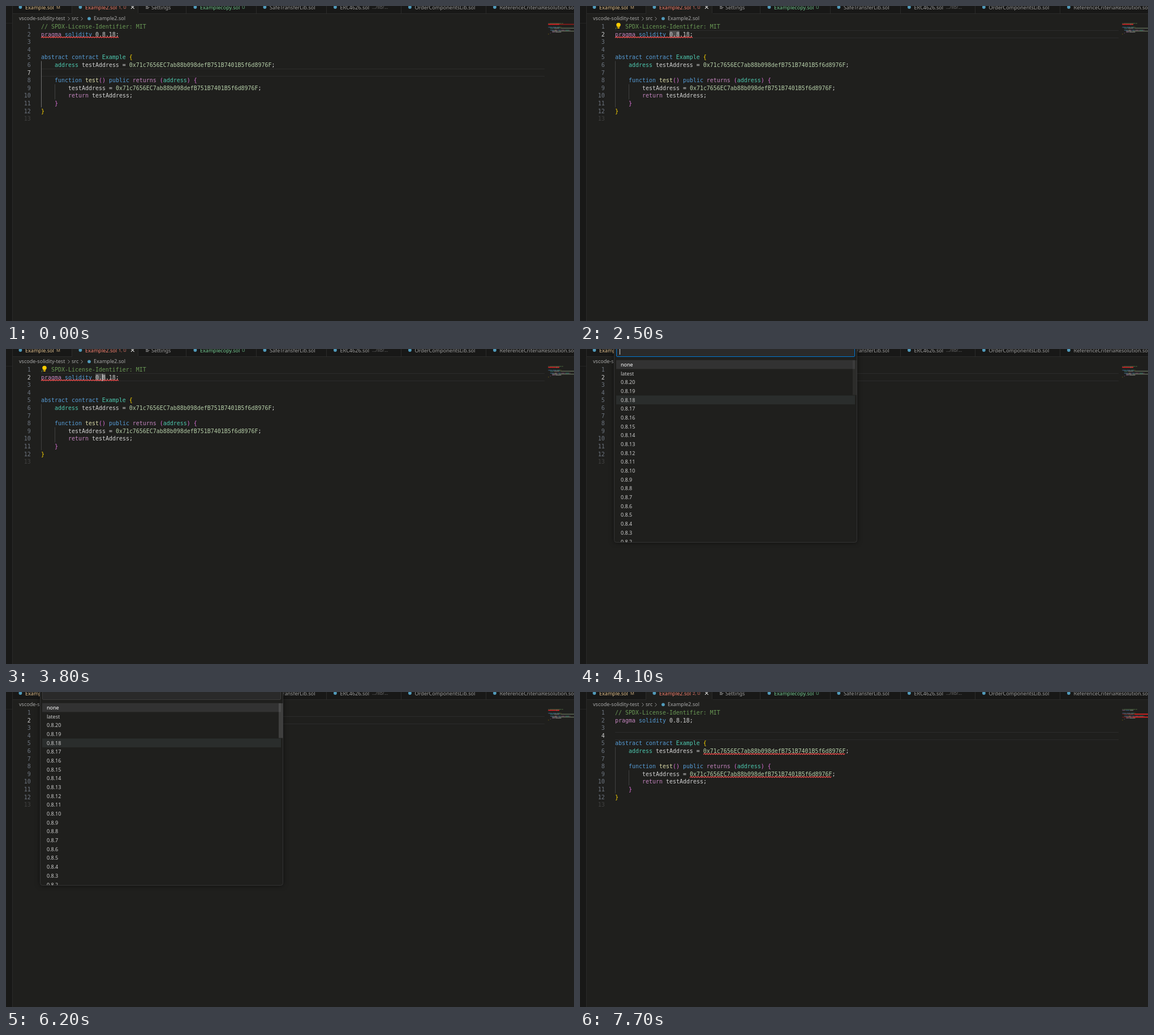
Animation of 1004 by 558 pixels, one loop 8000 ms. Source, as an HTML page:

```html
<!DOCTYPE html>
<html lang="en">
<head>
<meta charset="utf-8">
<title>Solidity editor</title>
<style>
  html, body { margin: 0; width: 100%; height: 100%; overflow: hidden; background: #1f1f1d; }
  svg { display: block; }
  text { white-space: pre; }
  .code { font: 9.967px "DejaVu Sans Mono", monospace; }
  .ui { font: 9px "Noto Sans", "Open Sans", sans-serif; }
</style>
</head>
<body>
<svg id="stage" width="1004" height="558" viewBox="0 0 1004 558"></svg>
<script>
const LOOP = 8000;
const BG = '#1f1f1d', PANEL = '#181817', LINE = '#2b2b2a';
const BLUE = '#569cd6', PINK = '#c586c0', TEAL = '#4ec9b0', GOLD = '#ffd700',
      ORCHID = '#da70d6', PLAIN = '#d4d4d4', NUM = '#b5cea8', FUNC = '#dcdcaa',
      GREEN = '#6a9955', RED = '#f14c4c', ICON = '#519aba';
const HEX = '0x71c7656EC7ab88b098defB751B7401B5f6d8976F';
const LEFT = 62, CHAR = 6, ROW = 13.6, TOP = 29.8;

const stage = document.getElementById('stage');

function add(parent, tag, attrs = {}, content) {
  const node = document.createElementNS('http://www.w3.org/2000/svg', tag);
  for (const key in attrs) node.setAttribute(key, attrs[key]);
  if (content !== undefined) node.textContent = content;
  parent.appendChild(node);
  return node;
}
const group = (parent = stage, attrs) => add(parent, 'g', attrs);
const rect = (p, x, y, width, height, fill, more) =>
  add(p, 'rect', { x, y, width, height, fill, ...more });
const path = (p, d, stroke, width = 1) =>
  add(p, 'path', { d, stroke, 'stroke-width': width, fill: 'none' });
const dot = (p, cx, cy, r = 2.9, fill = ICON) => add(p, 'circle', { cx, cy, r, fill });
const label = (p, x, y, str, fill, size = 9, more = {}) =>
  add(p, 'text', { class: 'ui', x, y, fill, style: `font-size:${size}px`, ...more }, str);
const show = (node, on) => node.setAttribute('visibility', on ? 'visible' : 'hidden');

const rowTop = n => TOP + ROW * (n - 1);
const baseline = n => rowTop(n) + 10.1;
const colX = c => LEFT + CHAR * c;

function bulb(p, x, y) {
  const g = group(p, { transform: `translate(${x} ${y})` });
  add(g, 'path', { d: 'M-2 2.6C-2 1.5-3.8.8-3.8-1.3A3.8 3.8 0 0 1 3.8-1.3C3.8.8 2 1.5 2 2.6Z', fill: '#ffcc00' });
  rect(g, -1.9, 3.3, 3.8, 1.8, '#d9ae08', { rx: .6 });
  return g;
}

function squiggle(p, line, from, to) {
  const y = rowTop(line) + 12, step = 2.14, end = colX(to);
  let d = `M${colX(from)} ${y + .8}`;
  for (let x = colX(from) + step, k = 0; x < end; x += step, k++) d += `L${x.toFixed(2)} ${y + (k % 2 ? .8 : -.8)}`;
  return path(p, d, RED, 1.25);
}

// Window chrome
rect(stage, 0, 0, 1004, 558, BG);
rect(stage, 0, 0, 11, 558, PANEL);
rect(stage, 0, 0, 1004, 13, PANEL);
rect(stage, 117, 0, 117, 14, BG);
path(stage, 'M11.5 0V558M12 13.5H117M235 13.5H1004', LINE);
path(stage, [117, 234, 319, 443, 567, 699, 849].map(x => `M${x - .5} 0V13`).join(''), LINE);
path(stage, 'M0 30.5H11', '#242424');

const TAB_Y = 5.5, DIM = '#9d9d9d';
const tabs = [
  [34, 'Example.sol', '#e2c08d'],
  [140, 'Example2.sol', '#f88070'],
  [343, 'Examplecopy.sol', '#73c991'],
  [466, 'SafeTransferLib.sol', DIM],
  [590.5, 'ERC4626.sol', DIM],
  [722.5, 'OrderComponentsLib.sol', DIM],
  [872.5, 'ReferenceCriteriaResolution.sol', DIM]
];
for (const [x, name, fill] of tabs) {
  dot(stage, x - 8.6, 2);
  label(stage, x, TAB_Y, name, fill, 9.05);
}
label(stage, 89, 5, 'M', '#c8aa7e', 7.6);
const problems = label(stage, 199, 5, '1, U', '#e0756a', 7.6);
label(stage, 417, 5, 'U', '#66b380', 7.6);
label(stage, 647, 5, '.../lib/...', '#707070', 8.1);
label(stage, 257, TAB_Y, 'Settings', DIM, 9.05);
path(stage, 'M247 .5H251M247 2.5H253.5M247 4.5H252', '#a8a8a8', .9);
path(stage, 'M221 -.8L226.6 4.8M226.6 -.8L221 4.8', '#e0e0e0', 1.1);

label(stage, 23, 25.4, 'vscode-solidity-test', '#a9a9a9', 9.05);
label(stage, 116, 25.4, 'src', '#a9a9a9', 9.05);
label(stage, 155, 25.4, 'Example2.sol', '#a9a9a9', 9.05);
path(stage, 'M109.5 19.5L112.5 22.5L109.5 25.5M132.5 19.5L135.5 22.5L132.5 25.5', '#a0a0a0', .9);
dot(stage, 147, 22.3);

// Code: each row is [indent, text, colour, text, colour, ...]
const code = [
  [0, '// SPDX-License-Identifier: MIT', GREEN],
  [0, 'pragma', PINK, ' solidity', BLUE, ' 0.8.18;', PLAIN],
  [0], [0],
  [0, 'abstract contract', BLUE, ' Example', TEAL, ' {', GOLD],
  [4, 'address', TEAL, ' testAddress = ', PLAIN, HEX, NUM, ';', PLAIN],
  [0],
  [4, 'function', BLUE, ' test', FUNC, '()', ORCHID, ' public', BLUE, ' returns', PINK, ' (', ORCHID, 'address', TEAL, ') {', ORCHID],
  [8, 'testAddress = ', PLAIN, HEX, NUM, ';', PLAIN],
  [8, 'return', PINK, ' testAddress;', PLAIN],
  [4, '}', ORCHID],
  [0, '}', GOLD],
  [0]
];

const currentLine = group();
path(currentLine, 'M62 .5H952M62 13.5H952', '#2b2b2b');
const wordMark = rect(stage, colX(16), 43.5, CHAR * 3, 13.5, '#4b4b4b');
const guide = path(stage, 'M62.5 97.5V179.5', '#404040');
path(stage, 'M86.5 138.5V165.5', '#404040');

const numbers = code.map((_, i) =>
  add(stage, 'text', { class: 'code', x: 43.8, y: baseline(i + 1), 'text-anchor': 'end' }, i + 1));
code.forEach(([indent, ...parts], i) => {
  if (!parts.length) return;
  const t = add(stage, 'text', { class: 'code', x: colX(indent), y: baseline(i + 1) });
  for (let k = 0; k < parts.length; k += 2) add(t, 'tspan', { fill: parts[k + 1] }, parts[k]);
});

const versionError = squiggle(stage, 2, 0, 23);
const hexErrors = group();
squiggle(hexErrors, 6, 26, 68);
squiggle(hexErrors, 9, 22, 64);
const caret = rect(stage, 0, 0, 1, 13, '#c8c8c8');

const hint = group();
rect(hint, 64.5, 30, 9.5, 12, BG);
bulb(hint, 68, 34.8);

// Minimap
const MAP_X = 958.5, MAP_W = .85, mapY = n => 30 + 1.72 * (n - 1);
const mapBar = (p, n, c, len, fill, opacity = 1) =>
  rect(p, MAP_X + c * MAP_W, mapY(n), len * MAP_W, 1.5, fill, { opacity });
code.forEach(([indent, ...parts], i) => {
  let c = indent;
  for (let k = 0; k < parts.length; k += 2) {
    for (const w of parts[k].matchAll(/\S+/g)) mapBar(stage, i + 1, c + w.index, w[0].length, parts[k + 1], .42);
    c += parts[k].length;
  }
});
const mapStrip = mapBar(stage, 2, 0, 60, '#c21a1a', .75);
const mapVersion = mapBar(stage, 2, 0, 23, '#e51c1c');
const mapHex = group();
for (const [n, c] of [[6, 26], [9, 22]]) {
  mapBar(mapHex, n, 0, 60, '#a01c1c', .55);
  mapBar(mapHex, n, c, 42, '#e51c1c');
}
const mapWord = mapBar(stage, 2, 16, 3, '#777', .5);

// Quick fix menu
const menu = group();
rect(menu, 69.5, 61.5, 180, 36.5, BG, { stroke: '#454545', style: 'filter:drop-shadow(0 1px 3px rgba(0,0,0,.4))' });
const menuFocus = rect(menu, 70, 81, 179, 16.5, '#323232');
label(menu, 76.5, 73.9, 'Quick Fix...', '#a6a6a6', 9, { 'font-weight': 700 });
bulb(menu, 82.5, 88.6);
label(menu, 92, 92.5, 'Change workspace compiler version', '#cccccc', 8.85);

// Version picker
const PICK_ROW = 15.68, pickTop = i => 19.7 + PICK_ROW * i;
const picker = group();
rect(picker, 60.5, -20.5, 429, 363, BG, { rx: 4, stroke: '#333333', style: 'filter:drop-shadow(0 0 4px rgba(0,0,0,.5))' });
const field = rect(picker, 64.5, -8.5, 421, 22, '#2a2a2a', { rx: 1.5 });
const fieldCaret = rect(picker, 70, 0, 1, 10, '#d0d0d0');
rect(picker, 64, pickTop(0), 422, PICK_ROW, '#323232');
const hover = rect(picker, 64, 0, 422, PICK_ROW, '#2a2d2c');
const scrollbar = rect(picker, 482, 20, 7.5, 61.5, '#797979');
const clip = add(add(stage, 'defs'), 'clipPath', { id: 'list' });
rect(clip, 61, 14, 428, 328, '#fff');
const list = group(picker, { 'clip-path': 'url(#list)' });
const versions = ['none', 'latest'];
for (let v = 20; v >= 2; v--) versions.push('0.8.' + v);
versions.forEach((v, i) => label(list, 72, pickTop(i) + 11.2, v, i ? '#cccccc' : '#ffffff', 9));

// Last value whose start time has passed
const at = (t, steps) => steps.reduce((v, [start, next]) => t >= start ? next : v, null);
const within = (t, ...spans) => spans.some(([a, b]) => t >= a && t < b);

function draw(t) {
  const line = at(t, [[0, 7], [1100, 2], [7200, 4]]);
  const fixed = t >= 6700;

  currentLine.setAttribute('transform', `translate(0 ${Math.round(rowTop(line))})`);
  numbers.forEach((n, i) => n.setAttribute('fill', i + 1 === line ? '#d0d0d0' : i === 12 ? '#404040' : '#6e7681'));
  guide.setAttribute('stroke', line === 7 ? '#707070' : '#404040');

  show(wordMark, within(t, [1300, 7200]));
  show(mapWord, within(t, [1300, 7200]));
  show(hint, within(t, [1500, 6900]));
  show(versionError, !fixed);
  show(mapVersion, !fixed);
  show(mapStrip, t < 1100);
  show(hexErrors, fixed);
  show(mapHex, fixed);
  problems.textContent = fixed ? '2, U' : '1, U';

  show(caret, within(t, [1100, 1500], [2100, 2500], [3800, 4100], [6300, 6700], [7200, 7700]));
  caret.setAttribute('x', line === 4 ? colX(1) : colX(18));
  caret.setAttribute('y', line === 4 ? 71 : 44);

  menu.style.display = within(t, [2700, 3800]) ? '' : 'none';
  menuFocus.style.display = within(t, [3300, 3400]) ? 'none' : '';

  picker.style.display = within(t, [4100, 6300]) ? '' : 'none';
  field.setAttribute('stroke', t < 6200 ? '#0078d4' : '#3c3c3c');
  fieldCaret.style.display = within(t, [4100, 4700], [5300, 5900]) ? '' : 'none';
  const row = at(t, [[0, 4], [4700, 3], [4800, 2], [4900, 1], [5500, 2], [5700, 3], [5900, 4]]);
  hover.setAttribute('y', pickTop(row));
  scrollbar.setAttribute('opacity', t < 6200 ? .14 : .36);
}

function tick() {
  draw(performance.now() % LOOP);
  requestAnimationFrame(tick);
}
tick();
</script>
</body>
</html>
```
